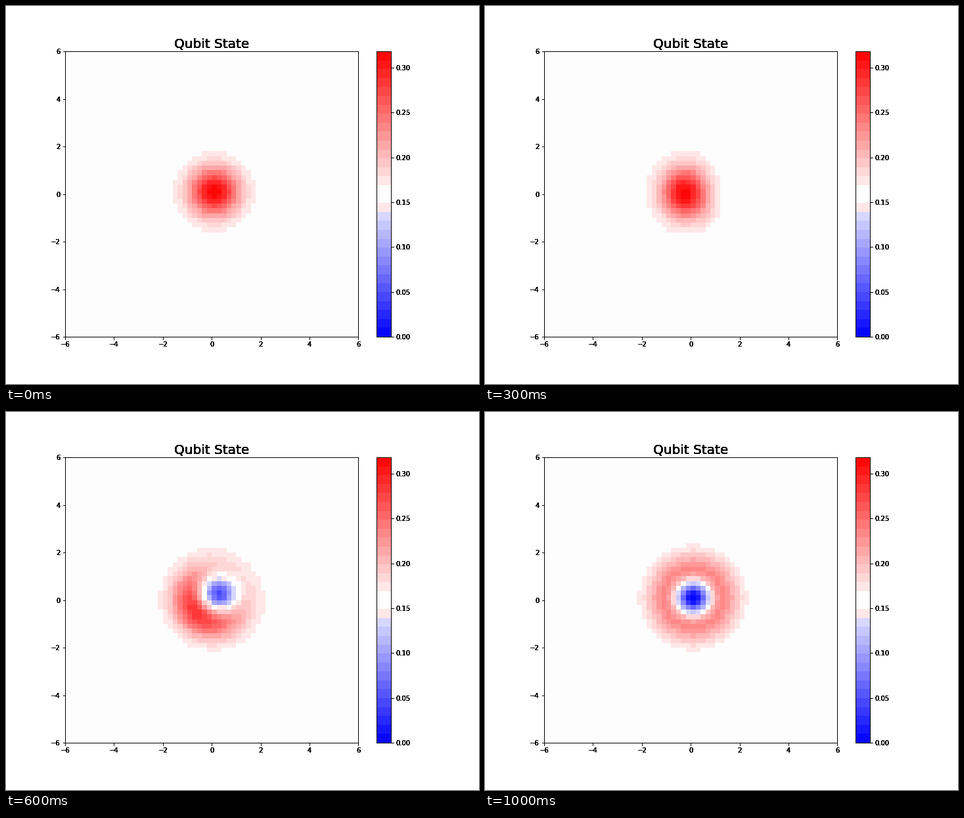
A matplotlib script that plays this animation: 720 px wide and 576 px high, repeating every 8000 ms.

```python
import numpy as np
import matplotlib.pyplot as plt
from matplotlib.animation import FuncAnimation
from matplotlib.colors import ListedColormap

plt.rcParams.update({"font.family": "DejaVu Sans", "font.size": 10})

W, H, DPI = 720, 576, 72
STEP_MS, FRAMES, LAST = 100, 80, 10
PEAK = 1 / np.pi
MAIN = [0.125, 0.125, 0.62, 0.755]
BAR = [0.78375, 0.125, 0.0302, 0.755]
OVERLAYS = 6  # stacked strokes give the heavy text and lines


def make_cmap():
    """Blue-white-red in 32 flat bands; the palest blue reads as pink."""
    shades = [(16 * k + 7) / 255 for k in range(15)]
    white = (253 / 255,) * 3
    blues = [(s, s, 1) for s in shades]
    reds = [(1, s, s) for s in reversed(shades)]
    blues[-1] = reds[0]
    return ListedColormap(blues + [white, white] + reds)


edges = np.linspace(-6, 6, 61)
X, Y = np.meshgrid(edges[:-1], edges[:-1])
R2 = X**2 + Y**2


def bloch_angles(step):
    """Polar and azimuth angle during a smooth flip from |0> to |1>."""
    m = step - LAST / 2
    tilt = 35.56 * m - 1.476 * m**3 + 0.04 * m**5
    theta = 90 + np.clip(tilt, -90, 90)
    phi = 90.55 + 129.85 * m + 0.05 * m**3
    return np.radians(theta), np.radians(phi)


def wigner(step):
    theta, phi = bloch_angles(step)
    p1 = np.sin(theta / 2) ** 2
    mix = np.sqrt(2) * np.sin(theta) * (X * np.cos(phi) + Y * np.sin(phi))
    return PEAK * np.exp(-R2) * (1 - 2 * p1 + 2 * p1 * R2 + mix)


def bare_axes(rect, xlim, ylim):
    ax = fig.add_axes(rect, xlim=xlim, ylim=ylim)
    ax.patch.set_visible(False)
    return ax


def draw_frames():
    ax = bare_axes(MAIN, (-6, 6), (-6, 6))
    ax.set_xticks(range(-6, 7, 2))
    ax.set_yticks(range(-6, 7, 2))
    ax.set_title("Qubit State", fontsize=20)

    bar = bare_axes(BAR, (0, 1), (0, PEAK))
    bar.set_xticks([])
    bar.yaxis.tick_right()
    ticks = np.arange(7) * 0.05
    bar.set_yticks(ticks, [f"{t:.2f}" for t in ticks])


fig = plt.figure(figsize=(W / DPI, H / DPI), dpi=DPI, facecolor="white")
cmap = make_cmap()

field = fig.add_axes(MAIN)
field.axis("off")
mesh = field.pcolormesh(edges, edges, wigner(0), cmap=cmap, vmin=-PEAK, vmax=PEAK)
field.set(xlim=(-6, 6), ylim=(-6, 6))

scale = fig.add_axes(BAR)
scale.axis("off")
scale.pcolormesh([0, 1], np.linspace(0, PEAK, 33), np.arange(32)[:, None], cmap=cmap)
scale.set(xlim=(0, 1), ylim=(0, PEAK))

for _ in range(OVERLAYS):
    draw_frames()


def update(i):
    mesh.set_array(wigner(min(i, LAST)))
    return (mesh,)


anim = FuncAnimation(fig, update, frames=FRAMES, interval=STEP_MS,
                     init_func=lambda: update(0), repeat=True, repeat_delay=0)
plt.show()
```
